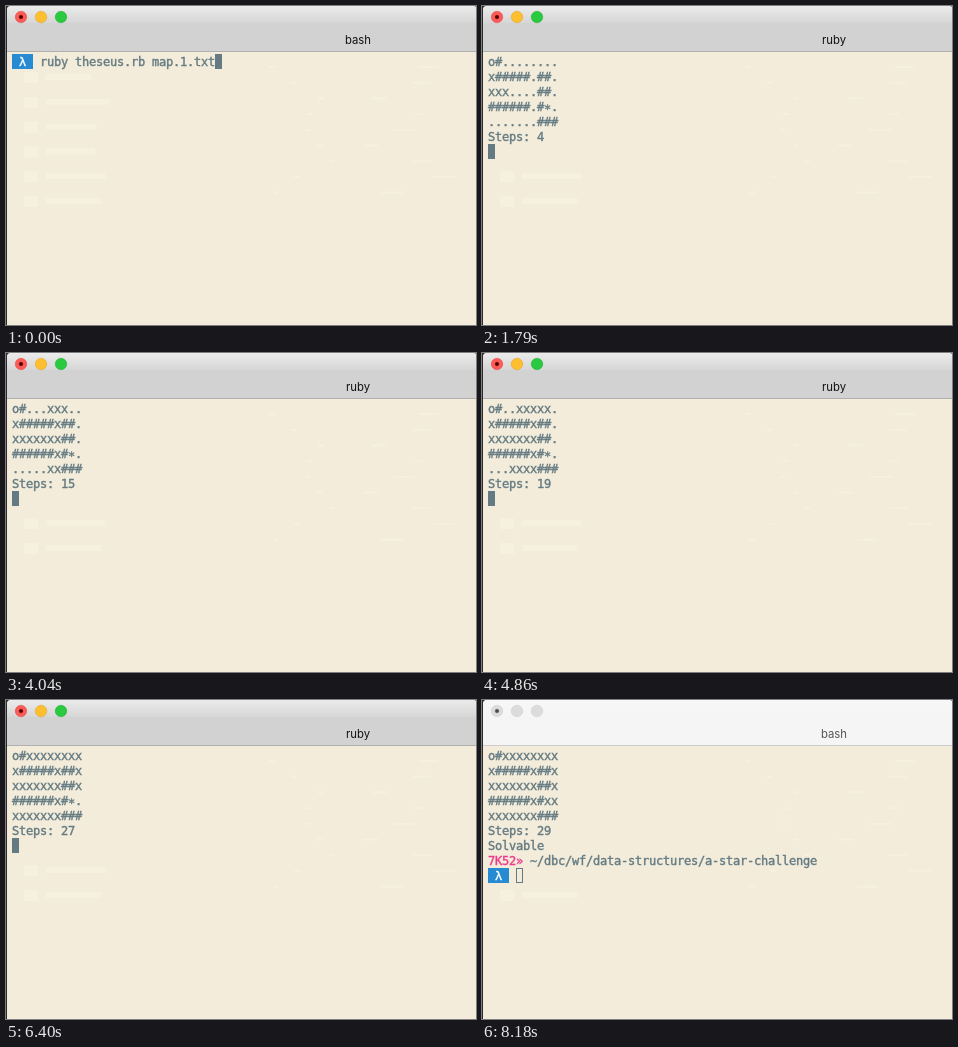
These frames come from a looping animation (470x319 px, 8330 ms). An HTML page with a canvas:

```html
<!DOCTYPE html>
<html lang="en">
<head>
<meta charset="utf-8">
<title>Maze search in a terminal</title>
<style>
  html, body { margin: 0; width: 100%; height: 100%; overflow: hidden; background: #2b2b2b; }
  canvas { display: block; }
</style>
</head>
<body>
<canvas id="stage" width="470" height="319"></canvas>
<script>
const WIDTH = 470, HEIGHT = 319, LOOP = 8330;
const LEFT = 6, TOP = 48, CELL = 7, LINE = 15;
const PAPER = '#f3ecda', INK = '#657b83', BLUE = '#268bd2', PINK = '#ef3a8b';

// The screen refreshes once per tick; all other times are counted in ticks.
const TICK = 118.5, STEP_TICKS = 1.7, SEARCH_START = 7.95;
const ENTER = 9, SOLVED = 59, EXIT = 60, BLUR = 69;

const COMMAND = 'ruby theseus.rb map.1.txt';
const GOAL = '∗';
const MAP = [
  'o#........',
  '.#####.##.',
  '.......##.',
  '######.#∗.',
  '.......###'
];

const ctx = document.getElementById('stage').getContext('2d');

// Breadth-first search: cells in the order they are visited, up to the goal.
function search() {
  const seen = new Set(['0,0']), queue = [[0, 0]], visited = [];
  while (queue.length) {
    const [row, col] = queue.shift();
    if (row || col) visited.push([row, col]);
    if (MAP[row][col] === GOAL) break;
    for (const [dr, dc] of [[1, 0], [-1, 0], [0, -1], [0, 1]]) {
      const r = row + dr, c = col + dc, key = r + ',' + c;
      const tile = MAP[r]?.[c];
      if (!tile || tile === '#' || seen.has(key)) continue;
      seen.add(key);
      queue.push([r, c]);
    }
  }
  return visited;
}
const VISITED = search();

function seededRandom(seed) {
  return () => (seed = seed * 16807 % 2147483647) / 2147483647;
}

function rect(x, y, w, h, color) {
  ctx.fillStyle = color;
  ctx.fillRect(x, y, w, h);
}

function circle(x, y, radius, fill, edge = fill) {
  ctx.beginPath();
  ctx.arc(x, y, radius, 0, Math.PI * 2);
  ctx.fillStyle = fill;
  ctx.fill();
  ctx.strokeStyle = edge;
  ctx.lineWidth = 0.5;
  ctx.stroke();
}

// A thin outline gives the glyphs the heavier look of smoothed terminal text.
function print(text, row, col = 0, color = INK) {
  ctx.font = '12px "DejaVu Sans Mono", monospace';
  ctx.textAlign = 'left';
  ctx.fillStyle = ctx.strokeStyle = color;
  ctx.lineWidth = 0.4;
  [...text].forEach((glyph, i) => {
    const x = LEFT + (col + i) * CELL, y = TOP + row * LINE + 12;
    ctx.fillText(glyph, x, y);
    ctx.strokeText(glyph, x, y);
  });
}

function cursor(row, col, focused = true) {
  const x = LEFT + col * CELL, y = TOP + row * LINE;
  if (focused) return rect(x, y, CELL, LINE, INK);
  ctx.strokeStyle = INK;
  ctx.lineWidth = 1;
  ctx.strokeRect(x + 0.5, y + 0.5, CELL - 1, LINE - 1);
}

function prompt(row) {
  rect(LEFT, TOP + row * LINE, 3 * CELL, LINE, BLUE);
  print('λ', row, 1, '#fff');
}

// Faint shapes showing through the translucent window.
function ghosts(tick) {
  const random = seededRandom(7);
  const tint = 'rgba(255,250,236,.25)';
  const hiddenAbove = tick < ENTER ? 0 : tick < EXIT ? 153 : 183;
  for (let y = 71; y < 200; y += 24.8) {
    const width = 45 + random() * 20;
    if (y < hiddenAbove) continue;
    rect(18, y - 5, 14, 11, tint);
    rect(40, y - 3, width, 6, tint);
  }
  for (let y = 60; y < 190; y += 15.7) {
    rect(230 + random() * 100, y, 6, 2, tint);
    rect(345 + random() * 90, y, 8 + random() * 16, 2, tint);
  }
}

function titleBar(title, focused) {
  const bar = ctx.createLinearGradient(0, 0, 0, 17);
  bar.addColorStop(0, focused ? '#ebebeb' : '#f7f7f7');
  bar.addColorStop(1, focused ? '#d6d6d6' : '#f5f5f5');
  rect(0, 0, WIDTH, 17, bar);
  rect(0, 17, WIDTH, 28, focused ? '#d2d2d2' : '#f5f5f5');
  rect(0, 45, WIDTH, 1, focused ? '#b0b0b0' : '#cbcbcb');

  const lights = focused
    ? [['#fc5b57', '#e2453f'], ['#fdbe2f', '#e0a028'], ['#29c940', '#1dad2b']]
    : Array(3).fill(['#dcdcdc', '#cbcbcb']);
  lights.forEach(([fill, edge], i) => circle(15 + i * 20, 11, 5.75, fill, edge));
  circle(15, 11, 1.8, focused ? '#4d0000' : '#4a4a4a');

  ctx.font = '11.3px Inter, sans-serif';
  ctx.textAlign = 'center';
  ctx.fillStyle = focused ? '#111' : '#555';
  ctx.fillText(title, 352, 38);
}

function terminal(tick, steps) {
  if (!steps) {
    prompt(0);
    print(COMMAND, 0, 4);
    return tick < ENTER ? cursor(0, 4 + COMMAND.length) : cursor(1, 0);
  }

  const grid = MAP.map(line => [...line]);
  for (const [row, col] of VISITED.slice(0, steps)) grid[row][col] = 'x';
  grid.forEach((line, row) => print(line.join(''), row));
  print('Steps: ' + steps, 5);
  if (tick < SOLVED) return cursor(6, 0);

  print('Solvable', 6);
  if (tick < EXIT) return cursor(7, 0);

  print('7K52»', 7, 0, PINK);
  print('~/dbc/wf/data-structures/a-star-challenge', 7, 6);
  prompt(8);
  cursor(8, 4, tick < BLUR);
}

function draw(now) {
  const tick = Math.floor(now % LOOP / TICK);
  const elapsedSteps = Math.floor((tick - SEARCH_START) / STEP_TICKS);
  const steps = Math.max(0, Math.min(VISITED.length, elapsedSteps));
  const running = steps > 0 && tick < EXIT;

  rect(0, 0, WIDTH, HEIGHT, '#2b2b2b');
  ctx.save();
  ctx.beginPath();
  ctx.roundRect(1, 0, WIDTH, HEIGHT + 10, 4);
  ctx.clip();
  rect(0, 0, WIDTH, HEIGHT, PAPER);
  ghosts(tick);
  titleBar(running ? 'ruby' : 'bash', tick < BLUR);
  terminal(tick, steps);
  ctx.restore();
  requestAnimationFrame(draw);
}

draw(0);
</script>
</body>
</html>
```
